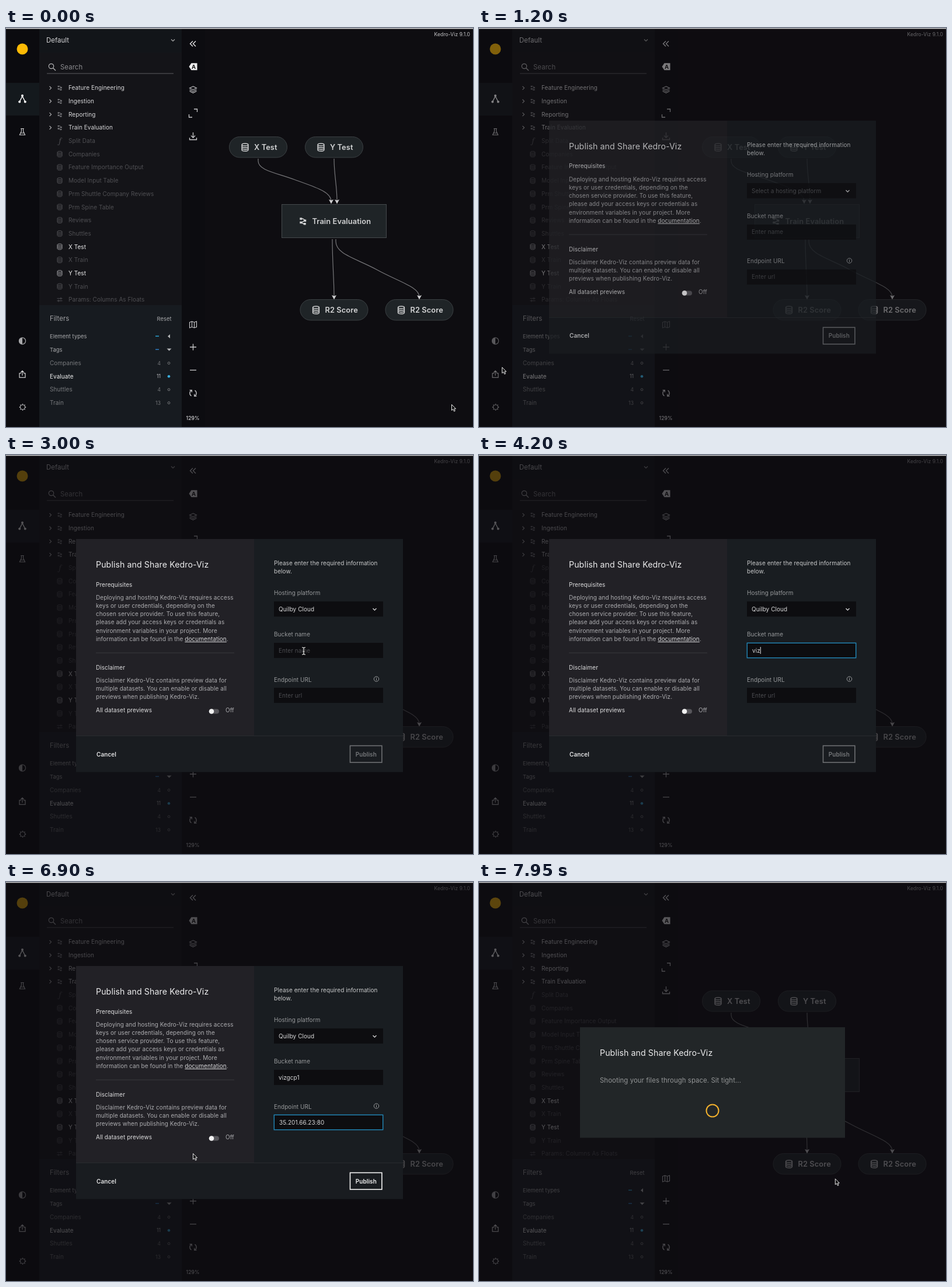
An HTML page with a canvas that plays this animation: 800 px wide and 684 px high, repeating every 8 s.

```html
<!DOCTYPE html>
<html lang="en">
<head>
<meta charset="utf-8">
<title>Publish and share</title>
<style>
html, body { margin: 0; width: 100%; height: 100%; overflow: hidden; background: #0e0d11; }
canvas { display: block; width: 800px; height: 684px; }
</style>
</head>
<body>
<canvas id="stage" width="800" height="684"></canvas>
<script>
const ctx = document.getElementById('stage').getContext('2d');
const LOOP = 8000, SLIDE = 56;
const INTER = 'Inter, "Open Sans", sans-serif';
ctx.letterSpacing = '0.08px';

const clamp = v => Math.max(0, Math.min(1, v));
const smooth = v => v * v * (3 - 2 * v);
const span = (t, a, b) => clamp((t - a) / (b - a));
const ease = (t, a, b) => smooth(span(t, a, b) ** 0.6);

function text(s, x, y, size, color, weight = 400, align = 'left', family = INTER) {
  ctx.font = `${weight} ${size}px ${family}`;
  ctx.fillStyle = color;
  ctx.textAlign = align;
  ctx.fillText(s, x, y + size * 0.36);
}
function rect(x, y, w, h, color) {
  ctx.fillStyle = color;
  ctx.fillRect(x, y, w, h);
}
function frame(x, y, w, h, color, width = 1) {
  ctx.strokeStyle = color;
  ctx.lineWidth = width;
  ctx.strokeRect(x, y, w, h);
}
// Draws an SVG path with its origin moved to x, y.
function icon(d, x, y, { stroke, fill, width = 1, scale = 1 }) {
  ctx.save();
  ctx.translate(x, y);
  ctx.scale(scale, scale);
  const path = new Path2D(d);
  if (fill) { ctx.fillStyle = fill; ctx.fill(path); }
  if (stroke) {
    ctx.strokeStyle = stroke;
    ctx.lineWidth = width / Math.abs(scale);
    ctx.stroke(path);
  }
  ctx.restore();
}
function disc(x, y, r, fill, stroke, width = 1) {
  ctx.beginPath();
  ctx.arc(x, y, r, 0, Math.PI * 2);
  if (fill) { ctx.fillStyle = fill; ctx.fill(); }
  if (stroke) { ctx.strokeStyle = stroke; ctx.lineWidth = width; ctx.stroke(); }
}
function faded(alpha, draw, dy = 0) {
  if (alpha <= 0) return;
  ctx.save();
  ctx.globalAlpha *= alpha;
  ctx.translate(0, dy);
  draw();
  ctx.restore();
}

const DATA = 'M-4-3.4a4 1.5 0 1 0 8 0a4 1.5 0 1 0-8 0V3.4a4 1.5 0 0 0 8 0V-3.4M-4-1.1a4 1.5 0 0 0 8 0M-4 1.2a4 1.5 0 0 0 8 0';
const PIPE = 'M-3-3H0L3-1L-2 2L2 4';
const PIPE_DOTS = 'M-4-4.4h3v2.6h-3zM1.4-2h3V.8h-3zM-4 .5h3v2.8h-3zM1 2.4h3V5h-3z';
const PARAMS = 'M-4.5-2H4.5M-4.5 2H4.5M2-4V0M-2 0V4';
const DOWN = 'M-3-1.5L0 1.5L3-1.5';

/* ---------- page ---------- */
const ROWS = ['Feature Engineering', 'Ingestion', 'Reporting', 'Train Evaluation', 'Split Data',
  'Companies', 'Feature Importance Output', 'Model Input Table', 'Prm Shuttle Company Reviews',
  'Prm Spine Table', 'Reviews', 'Shuttles', 'X Test', 'X Train', 'Y Test', 'Y Train',
  'Params: Columns As Floats'];
const TAGS = [['Companies', 4], ['Evaluate', 11], ['Shuttles', 4], ['Train', 13]];

function nav() {
  rect(0, 0, 57, 684, '#0b0b0f');
  rect(0, 94, 57, 56, '#14191d');
  disc(28, 36, 9.5, '#fcba05');
  const w = '#d2d2d3', g = '#a8a8aa';
  icon('M0-4L-4.6 5M0-4L4.6 5', 28, 121, { stroke: '#fff', width: 1.5 });
  for (const [x, y] of [[28, 116], [23.2, 126.5], [32.8, 126.5]]) disc(x, y, 2, '#fff');
  icon('M-2.8-5.5H2.8M-1.6-5.5V-1L-4.6 5.2H4.6L1.6-1V-5.5M-3 2H3', 28, 178, { stroke: w, width: 1.1 });
  disc(28, 536.5, 5.6, null, g, 1.2);
  icon('M0-5.6A5.6 5.6 0 0 0 0 5.6z', 28, 536.5, { fill: g });
  icon('M-2-1.6H-5V5.6H5V-1.6H2M0 2.5V-5.5M-2.8-3L0-5.8L2.8-3', 28, 593.5, { stroke: w, width: 1.2 });
  disc(28.5, 650, 4, null, g, 1.2);
  for (let i = 0; i < 8; i++) {
    const a = i * Math.PI / 4;
    disc(28.5 + 5 * Math.cos(a), 650 + 5 * Math.sin(a), 0.9, g);
  }
}

function sidebar() {
  rect(57, 0, 244, 684, '#141418');
  rect(57, 0, 244, 42, '#121519');
  text('Default', 69, 21, 11.36, '#d6d6d8');
  icon(DOWN, 286, 21, { stroke: '#aaa', width: 1.2 });
  disc(77.5, 65.5, 4.2, null, '#b5b5b7', 1.2);
  icon('M0 0L4.5 4.5', 80.5, 68.5, { stroke: '#b5b5b7', width: 1.3 });
  text('Search', 93, 67, 11.36, '#8c8c8f');
  rect(70, 77.5, 217, 1, '#5c5c60');
  ROWS.forEach((name, i) => {
    const y = 102.8 + i * 22.68, group = i < 4, on = name.endsWith(' Test');
    const mark = on ? '#929296' : '#4c4c50';
    text(name, 107, y, 9.96, on ? '#f0f0f1' : group ? '#d8d8da' : '#4f4f53');
    if (group) {
      icon('M-1.5-3L1.5 0L-1.5 3', 76, y, { stroke: '#b0b0b2', width: 1.2 });
      icon(PIPE, 92, y, { stroke: '#6e6e72', width: 1 });
      icon(PIPE_DOTS, 92, y, { fill: '#77777b', scale: 0.85 });
    } else if (i === 4) text('ƒ', 92, y, 12, mark, 'italic 400', 'center', '"Noto Serif", serif');
    else if (i === 16) icon(PARAMS, 92, y, { stroke: mark });
    else icon(DATA, 92, y, { stroke: mark });
  });
  rect(57, 475, 244, 209, '#171b20');
  text('Filters', 75, 498, 11.36, '#a2a3a5');
  text('Reset', 283.5, 498.5, 9.3, '#a8a9ab', 400, 'right');
  text('Element types', 75, 528.5, 9.3, '#aaabad');
  text('Tags', 75, 551.5, 9.3, '#aaabad');
  rect(256, 527.5, 6, 1.6, '#2a9bc8');
  rect(256, 550.3, 6, 1.6, '#2e77b8');
  icon('M2-3.5V3.5L-2 0z', 279, 528.5, { fill: '#b4b5b7' });
  icon('M-4-2H4L0 2z', 279.5, 551.5, { fill: '#b4b5b7' });
  TAGS.forEach(([name, n], i) => {
    const y = 574.5 + i * 22.7, on = i === 1;
    text(name, 75, y, 9.96, on ? '#f2f2f2' : '#77797c');
    text(n, 265, y, 8.54, on ? '#b8babc' : '#737578', 400, 'right');
    if (on) disc(279, y, 2.3, '#3aaede');
    else disc(279, y, 1.9, null, '#77797c');
  });
}

function toolbar() {
  rect(301, 0, 40, 684, '#0c0c10');
  const w = { stroke: '#c9c9cb', width: 1.3 };
  icon('M0-4.5L-4.5 0L0 4.5M5-4.5L.5 0L5 4.5', 320, 27, { stroke: '#e4e4e5', width: 1.4 });
  icon('M-7 0L-3-6H7V6H-3z', 320.5, 66.3, { fill: '#efefef' });
  text('A', 321.5, 66.5, 9.5, '#111', 700, 'center');
  icon('M0-5.5L6-2.5L0 .5L-6-2.5zM-6 .2L0 3.2L6 .2M-6 2.8L0 5.8L6 2.8', 320.5, 105.5, { ...w, width: 1.1 });
  icon('M1.5-7H7V-2M-7 2V7H-1.5', 320.5, 146, w);
  icon('M0-6V3M-3.5-.5L0 3L3.5-.5M-6 3V6.5H6V3', 320.5, 185, w);
  icon('M-6-4L-2-5.5L2-4L6-5.5V4L2 5.5L-2 4L-6 5.5zM-2-5.5V4M2-4V5.5', 320.5, 508.5, { ...w, width: 1.1 });
  icon('M-5.5 0H5.5M0-5.5V5.5', 320.5, 547, w);
  icon('M-5.5 0H5.5', 320.5, 586.5, w);
  icon('M-3 4.8A5.6 5.6 0 0 1-2.5-5M3-4.8A5.6 5.6 0 0 1 2.5 5M-6-5.2H-2.2V-1.5M6 5.2H2.2V1.5', 320.5, 626, w);
  text('129%', 320, 668.5, 8.54, '#d8d8da', 500, 'center');
}

function pill(x, y, w, label) {
  ctx.beginPath();
  ctx.roundRect(x + 0.5, y + 0.5, w - 1, 35.5, 18);
  ctx.fillStyle = '#1f2427';
  ctx.fill();
  ctx.strokeStyle = '#3b4043';
  ctx.lineWidth = 1;
  ctx.stroke();
  icon(DATA, x + 27.5, y + 18.5, { stroke: '#d2d3d4', width: 1.5, scale: 1.35 });
  text(label, x + 43, y + 18.5, 12.85, '#d2d3d4', 600);
}

function graph() {
  rect(341, 0, 459, 684, '#0e0d11');
  text('Kedro-Viz 9.1.0', 795, 10.5, 8.54, '#c6c6c8', 400, 'right');
  const edges = 'M432 224V228C432 244 462 248 494.5 260C527 272 557 280 557 297' +
    'M562 224C562 252 567 270 567 297M559 362C559 402 562 430 562 461' +
    'M565 362V366C565 388 600 395 636.5 415C673 435 708 444 708 461';
  icon(edges, 0, 0, { stroke: '#77777a', width: 1.2 });
  for (const [x, y] of [[557, 300], [567, 300], [562, 464], [708, 464]])
    icon('M-4-6L0-4.5L4-6L0 1.5z', x, y, { fill: '#d0d0d2' });
  pill(382, 186, 100, 'X Test');
  pill(512, 186, 100, 'Y Test');
  pill(503.5, 465, 117, 'R2 Score');
  pill(649.5, 465, 117, 'R2 Score');
  rect(472, 302, 180, 58, '#1f2427');
  frame(472.5, 302.5, 179, 57, '#45494c');
  icon(PIPE, 508.5, 331, { stroke: '#d2d3d4', width: 1.5, scale: 1.35 });
  icon(PIPE_DOTS, 508.5, 331, { fill: '#d2d3d4', scale: 1.3 });
  text('Train Evaluation', 524.5, 331.3, 12.85, '#d2d3d4', 600);
}

function tooltip() {
  rect(46, 581, 102.5, 23.5, '#e6e6e6');
  icon('M0-4.5L-5 0L0 4.5z', 46, 592.5, { fill: '#e6e6e6' });
  text('Publish and share', 53.5, 593, 11, '#16161a', 400, 'left', '"Liberation Sans", Arial, sans-serif');
}

/* ---------- dialog ---------- */
const PREREQ = ['Deploying and hosting Kedro-Viz requires access', 'keys or user credentials, depending on the',
  'chosen service provider. To use this feature,', 'please add your access keys or credentials as',
  'environment variables in your project. More', 'information can be found in the '];
const NOTICE = ['Disclaimer Kedro-Viz contains preview data for',
  'multiple datasets. You can enable or disable all', 'previews when publishing Kedro-Viz.'];
const OPTIONS = ['Velmora Web Hosts', 'Quilby Cloud', 'Northwick Stack'];
const BUCKET = 'vizgcp1', KEYS = [3750, 3900, 4200, 4500, 4900, 5200, 5500];
const URL_TEXT = '35.201.66.23:80';
const PICK = 2750, FOCUS_NAME = 3250, FOCUS_URL = 6100, PASTE = 6500;

function lines(list, x, y, color) {
  list.forEach((s, i) => text(s, x, y + i * 14.2, 9.96, color));
}

function field(y, value, hint, focused, t, last) {
  rect(459, y - 13, 187, 26, '#0d0d10');
  const x = focused ? 468 : 467;
  text(value || hint, x, y, 9.96, value ? '#d9d9da' : '#4b4c50');
  if (!focused) return;
  frame(459.3, y - 12.7, 186.4, 25.4, '#2187b8', 1.4);
  if ((t - last) % 600 < 400) rect(x + (value ? ctx.measureText(value).width : 0), y - 6, 1, 12, '#e8e8e8');
}

function dialog(t) {
  rect(120, 144, 305, 337, '#222126');
  rect(425, 144, 255, 337, '#191d21');
  rect(120, 481, 560, 62.5, '#191c20');
  rect(120, 481, 560, 1, '#282b2f');
  const body = '#adadb0', head = '#dededf';
  text('Publish and Share Kedro-Viz', 154, 188, 14.2, '#ededee');
  text('Prerequisites', 154, 222, 9.96, head);
  lines(PREREQ, 154, 244.3, body);
  const linkX = 154 + ctx.measureText(PREREQ[5]).width;
  text('documentation', linkX, 315.3, 9.96, '#d6d6d8');
  const linkW = ctx.measureText('documentation').width;
  rect(linkX, 320, linkW, 1, '#d6d6d8');
  text('.', linkX + linkW, 315.3, 9.96, body);
  rect(154, 338.7, 237, 1, '#3a393e');
  text('Disclaimer', 154, 364.3, 9.96, head);
  lines(NOTICE, 154, 386.5, body);
  text('All dataset previews', 154, 437.5, 9.96, head);
  ctx.beginPath();
  ctx.roundRect(348.5, 435.5, 16.5, 8, 4);
  ctx.fillStyle = '#57565b';
  ctx.fill();
  disc(352, 439.5, 4.3, '#f2f2f2');
  text('Off', 376, 437.5, 9.96, body);

  lines(['Please enter the required information', 'below.'], 459, 185.2, '#c9cacb');
  const label = '#97999b';
  text('Hosting platform', 459, 236.5, 9.96, label);
  text('Bucket name', 459, 307.3, 9.96, label);
  text('Endpoint URL', 459, 385, 9.96, label);
  disc(634.5, 384, 4.2, null, '#9a9c9e');
  icon('M0-.8V2.3M0-2.4V-1.4', 634.5, 384, { stroke: '#9a9c9e' });

  const open = span(t, 1950, 2050) * (1 - span(t, PICK, PICK + 100));
  rect(459, 251, 187, 26, '#0d0d10');
  if (t < PICK) text('Select a hosting platform', 467, 264.5, 9.96, '#56575b');
  else text(OPTIONS[1], 467, 264.5, 9.96, '#d9d9da');
  icon(DOWN, 631.5, 264.5, { stroke: '#cfcfd0', width: 1.4, scale: open > 0.5 ? -1 : 1 });

  const typed = KEYS.filter(k => t >= k);
  const onUrl = t >= FOCUS_URL;
  field(335, BUCKET.slice(0, typed.length), 'Enter name', t >= FOCUS_NAME && !onUrl, t, typed.at(-1) || FOCUS_NAME);
  const ready = t >= PASTE;
  field(412, ready ? URL_TEXT : '', 'Enter url', onUrl, t, ready ? PASTE : FOCUS_URL);

  faded(open, () => {
    rect(459, 277, 187, 79, '#0d0d10');
    const over = t > 2350 ? 1 : 0;
    rect(459, 277 + over * 26.3, 187, 26.3, '#17191d');
    OPTIONS.forEach((s, i) => text(s, 467, 289.5 + i * 26.3, 9.96, '#c4c4c6'));
  });

  text('Cancel', 155, 513, 9.96, '#e4e4e5', 600);
  frame(589.5, 498.4, 54.4, 28.6, ready ? '#f4f4f4' : '#6e7073', 1.6);
  text('Publish', 616.8, 513, 9.96, ready ? '#f4f4f4' : '#76787b', 600, 'center');
}

function progress() {
  rect(173, 249, 454, 189.5, '#222628');
  text('Publish and Share Kedro-Viz', 207, 293, 14.2, '#ededee');
  text('Shooting your files through space. Sit tight...', 207, 339.7, 11.36, '#939596');
  disc(400, 392, 10.5, null, '#f3b12d', 2);
}

/* ---------- pointer ---------- */
const linear = v => v, speedUp = v => v ** 1.6;
// [start, end, from, control, to, easing]
const MOVES = [
  [150, 930, [763, 645], [330, 45], [28, 597], smooth],
  [1100, 1800, [28, 597], [150, 420], [335, 338], speedUp],
  [1800, 1950, [335, 338], [430, 290], [505, 268], linear],
  [2200, 2600, [505, 268], [503, 292], [508, 312], smooth],
  [2780, 3000, [508, 312], [509, 324], [510, 336], smooth],
  [5750, 6100, [510, 336], [530, 375], [540, 412], smooth],
  [6520, 6800, [540, 412], [430, 430], [306, 470], smooth],
  [6800, 6900, [306, 470], [308, 464], [320, 465], smooth],
  [6900, 7300, [320, 465], [470, 480], [609.8, 508.3], smooth]
];
const LOOKS = [[0, 'arrow'], [890, 'hand'], [1130, 'arrow'], [1900, 'hand'], [2850, 'beam'],
  [3750, ''], [5750, 'beam'], [6500, ''], [6540, 'arrow'], [7240, 'hand'], [7450, 'arrow']];

function pointer(t) {
  const look = LOOKS.findLast(l => t >= l[0])[1];
  const [a, b, p, c, q, curve] = MOVES.findLast(m => t >= m[0]) || MOVES[0];
  const u = curve(span(t, a, b)), v = 1 - u;
  const [x, y] = [0, 1].map(i => v * v * p[i] + 2 * u * v * c[i] + u * u * q[i]);
  if (look === 'arrow')
    icon('M.5.5V10.5L2.8 8.4L4.6 12.2L6.3 11.4L4.6 7.8H7.6z', x, y, { fill: '#0a0a0c', stroke: '#ececec', width: 1 });
  if (look === 'hand')
    icon('M-1 1Q0-.8 1 1V4L4.5 5Q5.4 5.4 5 7L4 11H-1L-4 7Q-4.3 5.6-2.8 6L-1 7.2z', x, y, { fill: '#fff', stroke: '#111', width: 0.8 });
  if (look === 'beam') {
    const d = 'M-3-6H-1.2L0-5L1.2-6H3M0-5V5M-3 6H-1.2L0 5L1.2 6H3M-1.5 1H1.5';
    icon(d, x, y, { stroke: '#111', width: 2.6 });
    icon(d, x, y, { stroke: '#f0f0f0', width: 1.2 });
  }
}

function draw(t) {
  graph();
  nav();
  sidebar();
  toolbar();
  rect(0, 0, 800, 1.5, '#d3d3d5');
  const shown = ease(t, 1000, 1400);
  const gone = ease(t, 7350, 7750);
  const next = ease(t, 7450, 7850);
  faded(span(t, 900, 940) * (1 - span(t, 1130, 1200)), tooltip);
  faded(0.7 * shown - 0.03 * gone, () => rect(0, 1.5, 800, 683, '#0e0c11'));
  faded(shown * (1 - gone), () => dialog(t), SLIDE * (1 - shown + gone));
  faded(next, progress, SLIDE * (1 - next));
  pointer(t);
}

function tick() {
  draw(performance.now() % LOOP);
  requestAnimationFrame(tick);
}
tick();
</script>
</body>
</html>
```
